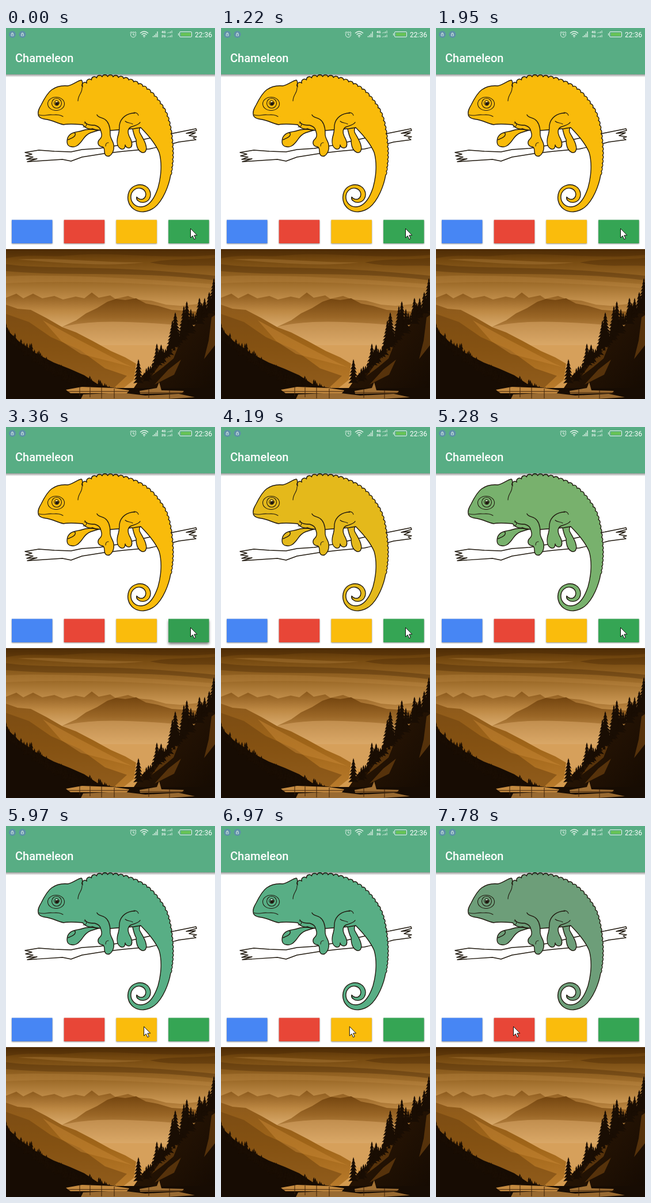
Animation of 363x641 px, one loop 8 s. Source, as an HTML page:

```html
<!DOCTYPE html>
<html lang="en">
<head>
<meta charset="utf-8">
<title>Chameleon</title>
<style>
  html, body { margin: 0; width: 100%; height: 100%; overflow: hidden; background: #fff; }
  svg { display: block; width: 363px; height: 641px; }
  text { font-family: Roboto, sans-serif; fill: #fff; }
  .ink { fill: none; stroke: #211a10; stroke-width: 1.4; stroke-linejoin: round; stroke-linecap: round; }
  .skin path { fill: inherit; }
  #buttons rect { filter: drop-shadow(0 1px 1px #0007); }
  #buttons rect.pressed { filter: drop-shadow(0 3px 2px #0008) brightness(.96); }
</style>
</head>
<body>
<svg viewBox="0 0 363 641">
  <defs>
    <linearGradient id="shade" x2="0" y2="1"><stop stop-color="#0006"/><stop offset="1" stop-color="#0000"/></linearGradient>
    <linearGradient id="sky" x2="0" y2="1">
      <stop stop-color="#532f06"/><stop offset=".12" stop-color="#74480f"/><stop offset=".38" stop-color="#9c6a28"/>
      <stop offset=".62" stop-color="#c79450"/><stop offset="1" stop-color="#dcae70"/>
    </linearGradient>
    <linearGradient id="far" x2="0" y2="1"><stop stop-color="#8a581b"/><stop offset=".5" stop-color="#bd8843"/><stop offset="1" stop-color="#dcae70"/></linearGradient>
    <linearGradient id="mid" x2="0" y2="1"><stop stop-color="#74450f"/><stop offset=".4" stop-color="#9a6626"/><stop offset="1" stop-color="#dcab69"/></linearGradient>
    <linearGradient id="slope" x2="0" y2="1"><stop stop-color="#8c591b"/><stop offset=".45" stop-color="#a06518"/><stop offset="1" stop-color="#bf8030"/></linearGradient>
    <linearGradient id="rock" x2="1" y2="1"><stop stop-color="#331b05"/><stop offset="1" stop-color="#140a02"/></linearGradient>
    <clipPath id="frame"><path d="M0 382H363V641H0Z"/></clipPath>
  </defs>

  <rect width="363" height="641" fill="#fff"/>

  <g clip-path="url(#frame)">
    <rect y="382" width="363" height="150" fill="url(#sky)"/>
    <rect y="530" width="363" height="111" fill="#d49a4e"/>
    <g fill="#442504" opacity=".35">
      <path d="M0 382H363V392C270 401 190 385 110 393C70 397 40 389 0 398Z"/>
      <path d="M250 405C290 397 330 401 363 397V411C320 409 290 414 250 405Z"/>
      <path d="M0 408C70 418 170 408 363 428V436C230 419 110 430 0 420Z"/>
    </g>
    <g fill="#c28e49" opacity=".3">
      <path d="M0 429C90 425 220 432 363 443V450C230 439 100 436 0 441Z"/>
      <path d="M20 400C100 396 160 406 240 405C170 413 90 405 20 400Z"/>
    </g>
    <path fill="url(#far)" d="M0 466L18 459L30 467L47 459L63 467L84 463L99 469L121 464L136 467L149 457L161 466L181 462L190 468L212 463L228 469L252 471L278 478L303 480L363 474V520H0Z"/>
    <path fill="url(#mid)" d="M98 516L122 505L139 493L158 484L176 473L191 468L207 470L226 467L243 476L264 480L288 487L363 492V548H80Z"/>
    <path fill="#d9a766" opacity=".55" d="M84 520C150 500 230 508 330 516L260 590H190Z"/>
    <path fill="url(#slope)" d="M0 478L20 485L43 487L70 501L98 517L122 526L151 541L182 558L207 569L226 580L222 608L180 641H0Z"/>
    <path fill="#6a3f0c" opacity=".5" d="M0 494L40 508L78 534L128 556L172 588L210 601L184 625L90 590L0 530Z"/>
    <path fill="#c98a38" opacity=".45" d="M64 505L125 538L204 579L220 586L130 563L96 541Z"/>
    <path fill="url(#rock)" d="M363 462L348 489L328 514L308 530L293 546L274 562L258 584L237 600L222 622L214 641H363Z"/>
    <g fill="#744510" opacity=".65">
      <path d="M285 556L300 548L291 571L273 586L253 601L270 578Z"/>
      <path d="M357 500L363 496V548L344 572L352 540Z"/>
      <path d="M282 590L304 573L292 599L258 616Z"/>
    </g>
    <path fill="#170c03" d="M0 520L24 543L52 562L83 578L111 589L136 600L160 616L188 622H363V641H0Z"/>
    <g id="trees" fill="#190d03"/>
    <g fill="#c48a40">
      <path d="M104 625L132 620L187 622L214 626L210 631H112Z"/>
      <path d="M134 633L200 630L242 635L300 632L328 638L280 641H130Z" opacity=".75"/>
      <path d="M232 627L262 622L266 612L270 626L309 627L306 631L233 632Z" opacity=".8"/>
    </g>
    <path fill="none" stroke="#3c2108" d="M108 628H212M128 620V636M146 621V638M166 621V640M188 623V640M232 630H310M248 624V639M284 626V640"/>
  </g>

  <g class="ink">
    <path d="M33 215L57 211L84 213L113 214L132 210L162 208L193 203L246 191L290 182L330 174L331 177L313 182L329 181L318 186L331 188L325 190L330 193L300 197L285 201L249 209L204 213L170 217L132 223L113 230L98 227L37 231L54 226L36 227L47 223L34 221L45 218Z"/>
  </g>
  <g id="skin" class="ink skin">
    <path d="M156 176C147 174 138 175 130 178C121 180 111 180 107 190C105 198 106 204 113 205C121 207 126 202 131 196C135 191 137 185 147 181L163 176M119 187C121 184 121 181 118 181M108 193C112 191 116 190 119 187"/>
    <path d="M219 170C221 180 222 186 226 193C226 204 229 212 236 215C243 217 245 209 243 203C242 196 236 188 232 180C231 176 232 172 234 172"/>
    <path id="body"/>
    <path d="M158 150C160 155 166 154 172 158C179 163 181 172 181 182C180 187 183 191 186 198C189 206 187 216 180 221C174 223 171 219 171 213C171 209 170 205 166 205C160 204 158 198 162 193C167 189 167 184 165 179C164 172 160 170 154 168C148 168 140 168 137 162"/>
    <path d="M224 147C210 147 199 155 197 168C197 175 196 182 194 188C192 197 193 206 200 209C206 211 207 205 207 202C207 206 213 209 217 206C221 201 218 194 214 187C211 181 211 174 217 171C224 168 230 168 233 163"/>
  </g>
  <g class="ink">
    <path d="M132 103C133 112 125 115 125 126M57 150C66 153 72 149 80 150C88 150 93 149 99 153M136 164C142 164 141 171 134 171M207 161C211 165 216 163 220 166M222 146C226 146 229 148 230 151M173 204C173 200 175 198 178 198" stroke-width="1.1"/>
    <ellipse cx="87" cy="131" rx="14.5" ry="11.5" stroke-width="1.1"/>
    <circle cx="88" cy="130" r="8.5" stroke-width="1.1"/>
    <circle cx="88" cy="129.500" r="4.300" stroke-width="1"/>
    <circle cx="88.500" cy="130.500" r="2.500" fill="#211a10"/>
    <circle cx="88" cy="127.500" r="1.100" fill="#fff" stroke="none"/>
  </g>

  <rect y="80" width="363" height="5" fill="url(#shade)"/>
  <rect width="363" height="80" fill="#58ad84"/>
  <text x="16" y="59" font-size="20" font-weight="500">Chameleon</text>
  <text x="328" y="16" font-size="12">22:36</text>
  <g fill="none" stroke="#e6f4ec">
    <g id="locks"></g>
    <circle cx="221" cy="11.500" r="4.500"/>
    <path d="M221 8.500V12H223.500M215.500 8.500L218 6M226.500 8.500L224 6"/>
    <path d="M233 9Q240 3 247 9M235.500 11.500Q240 7.500 244.500 11.500M238 14Q240 12 242 14" stroke-width="1.300"/>
    <circle cx="240" cy="15.500" r=".6"/>
    <path d="M255.500 16V14M258 16V12M260.500 16V9.500M263 16V6" stroke-width="1.300"/>
    <path d="M280.500 9V8M283 9V7M285.500 9V6M288 9V4.500M280.500 16V15M283 16V14M285.500 16V13M288 16V11.500"/>
    <rect x="301.500" y="6.500" width="21" height="9" rx="1.500"/>
    <path d="M299.500 9V13"/>
    <rect x="304" y="8.500" width="17" height="5" fill="#69c455" stroke="none"/>
  </g>
  <text x="270" y="9" font-size="6" font-weight="700">4G</text>
  <text x="270" y="16" font-size="6" font-weight="700">2G</text>

  <g id="buttons"></g>
  <path id="cursor" d="M0 0V16L3.700 12.600L6.300 18.500L8.800 17.400L6.300 11.600H11.300Z" fill="#fff" stroke="#111" stroke-linejoin="round"/>
</svg>

<script>
const NS = 'http://www.w3.org/2000/svg';
const $ = id => document.getElementById(id);
const add = (parent, tag, attrs) => {
  const el = parent.appendChild(document.createElementNS(NS, tag));
  for (const key in attrs) el.setAttribute(key, attrs[key]);
  return el;
};

// Body outline: the crest is a chain of small arcs along the spine
function bodyPath() {
  const spine = document.createElementNS(NS, 'path');
  spine.setAttribute('d', 'M133 102C140 95 150 85 172 84C192 84 208 86 230 97C250 106 262 122 272 137C283 152 287 180 289 205C290 222 289 236 286 254');
  const length = spine.getTotalLength(), count = 34;
  let crest = '';
  for (let i = 1; i <= count; i++) {
    const u = i / count;
    const p = spine.getPointAtLength(length * u * (1.2 - .2 * u));
    crest += `A5 5 0 0 1 ${p.x} ${p.y}`;
  }
  return 'M56 149C55 143 58 138 61 133C65 125 71 113 79 107C86 102 96 99 107 100C117 98 124 91 131 90C134 92 132 98 133 102' + crest +
    'C283 272 273 298 258 310C246 319 232 320 222 313C212 306 209 293 214 282C219 272 232 268 242 273C251 278 253 288 249 295' +
    'C245 302 235 303 230 299C227 297 226 295 227 292C230 296 237 298 241 293C245 287 242 279 234 277C225 275 218 282 217 290' +
    'C216 300 223 309 234 309C247 309 257 297 264 276C270 255 271 232 266 215C261 203 252 190 234 172' +
    'L222 174L182 177Q160 178 150 174C143 176 138 173 133 167C120 166 110 165 100 167C90 165 82 160 71 158C62 157 56 155 56 149Z';
}
$('body').setAttribute('d', bodyPath());

let seed = 7;
const random = () => (seed = seed * 16807 % 2147483647) / 2147483647;

function tree(x, base, height) {
  const levels = Math.max(3, Math.round(height / 6));
  let left = '', right = '';
  for (let i = 1; i <= levels; i++) {
    const y = base - height + height * i / levels;
    const w = height * .22 * i / levels * (.8 + .4 * random()) + .6;
    right += `L${x + w} ${y}L${x + w * .4} ${y - 1}`;
    left = `L${x - w * .4} ${y - 1}L${x - w} ${y}` + left;
  }
  add($('trees'), 'path', { d: `M${x} ${base - height}${right}${left}Z` });
}
for (let i = 0; i < 75; i++) {
  const x = i * 2.6;
  tree(x, 532 + x * .85 - x * x * .0016 + random() * 8, 10 + random() * 13);
}
for (let i = 0; i < 34; i++) {
  const x = 240 + i * 3.7;
  tree(x, 607 - i * 4.1 + random() * 10, 12 + random() * 16);
}
[[230, 614, 42], [262, 583, 38], [269, 580, 32], [289, 552, 47], [294, 548, 57], [309, 532, 52], [314, 528, 56],
 [321, 525, 40], [336, 512, 46], [345, 500, 34], [353, 494, 38], [361, 490, 58]].forEach(t => tree(...t));

for (const x of [11, 28.5]) {
  add($('locks'), 'circle', { cx: x, cy: 11, r: 6, fill: '#5d8fa8', stroke: 'none' });
  add($('locks'), 'path', { d: `M${x - 2} 10.500h4v3h-4zM${x - 1.2} 10V8.800q1.200-1.600 2.400 0V10`, 'stroke-width': .8 });
}

const buttons = ['#4786f4', '#e84637', '#fabc0c', '#35a554'].map((fill, i) =>
  add($('buttons'), 'rect', { x: 10 + i * 90.7, y: 331.5, width: 70.5, height: 40.5, fill }));

const LOOP = 8000, FADE = 2320;
const YELLOW = [249, 187, 11], GREEN = [88, 174, 133], RED = [234, 67, 53];
const TICKS = [0, 3360, 3500, 3640, 3780, 3920, 4050, 4190, 4340, 4460, 4590, 4730, 4860, 4990, 5120, 5280, 5430,
  5570, 5700, 5830, 5970, 6090, 6230, 6970, 7110, 7240, 7380, 7510, 7780];

const ease = (t, start, length) => {
  const u = Math.min(1, Math.max(0, (t - start) / length));
  return (1 - Math.cos(Math.PI * u)) / 2;
};
const mix = (a, b, u) => a.map((v, i) => v + (b[i] - v) * u);

function draw(now) {
  const t = TICKS.findLast(tick => tick <= now % LOOP);
  const color = mix(mix(YELLOW, GREEN, ease(t, 3645, FADE)), RED, ease(t, 7203, FADE));
  $('skin').style.fill = `rgb(${color.map(Math.round)})`;
  const x = 320.5 - 81 * ease(t, 5500, 450) - 105 * ease(t, 6880, 350);
  $('cursor').setAttribute('transform', `translate(${x} 346.5)`);
  buttons[3].classList.toggle('pressed', t >= 3360 && t < 3780);
  buttons[1].classList.toggle('pressed', t >= 7240 && t < 7510);
}

const begin = performance.now();
(function loop() {
  draw(performance.now() - begin);
  requestAnimationFrame(loop);
})();
</script>
</body>
</html>
```
